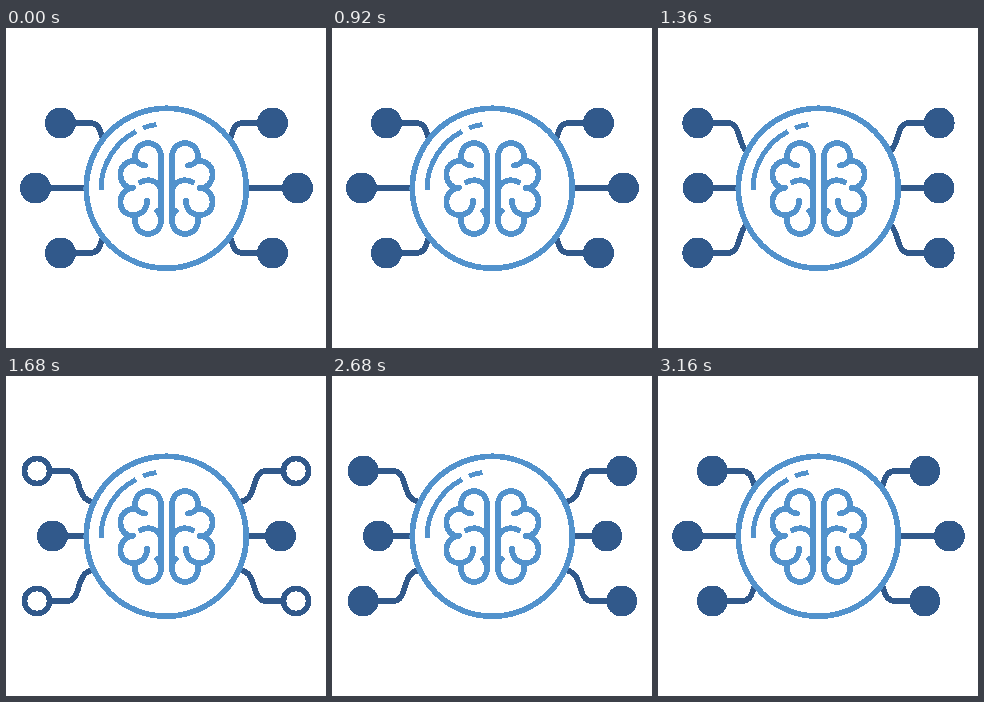
Animation, 320 px wide and 320 px high, one loop 3.64 s. Source, as an HTML page:

```html
<!DOCTYPE html>
<html lang="en">
<head>
<meta charset="utf-8">
<title>Brain network</title>
<style>
  html, body { margin: 0; width: 100%; height: 100%; overflow: hidden; background: #fff; }
  svg { display: block; width: 100vw; height: 100vh; }
</style>
</head>
<body>
<svg viewBox="0 0 320 320" fill="none" stroke-width="5.7" shape-rendering="crispEdges">
  <defs>
    <g id="node">
      <circle r="12.6" fill="#fff"/>
      <circle class="core" r="11" fill="#31598b" stroke="none"/>
    </g>
    <g id="corner">
      <path d="M31 95H60.5C69 95 70.5 102 73 110S78 126 90 126H130"/>
      <use href="#node" x="31" y="95"/>
    </g>
    <g id="side" stroke="#31598b">
      <g class="corner"><use href="#corner"/></g>
      <g transform="matrix(1 0 0 -1 0 320)"><g class="corner"><use href="#corner"/></g></g>
      <g class="middle">
        <path d="M29.500 160H110"/>
        <use href="#node" x="29.500" y="160"/>
      </g>
    </g>
    <g id="lobes" stroke-linecap="round" stroke-linejoin="round">
      <path d="M155 193V128A13 13 0 0 0 129 128C129 133 133 137 139 137.500"/>
      <path d="M130 133C121 132 114.500 138 114.500 146C114.500 155 120 160 127 160"/>
      <path d="M127 160C120 160 114.500 166 114.500 174C114.500 182 120 187 127 187C136 187 141 181 141 173"/>
      <path d="M130 187C129 189 129 191 129 193A13 13 0 0 0 155 193Q155 186 151 183"/>
      <path d="M135 154Q141 151 147 153T155 162"/>
    </g>
  </defs>
  <use href="#side"/>
  <use href="#side" transform="matrix(-1 0 0 1 321 0)"/>
  <g stroke="#5292cc">
    <circle cx="160.300" cy="160.300" r="80" fill="#fff"/>
    <path stroke-width="5" d="M95 162A65 65 0 0 1 130 103.500M137 100Q143 97.500 150.500 96.500"/>
    <use href="#lobes"/>
    <use href="#lobes" transform="matrix(-1 0 0 1 321 0)"/>
  </g>
</svg>
<style id="pose"></style>
<script>
const LOOP = 3640, STEP = 40;
const pose = document.getElementById("pose");
const clamp = v => Math.min(1, Math.max(0, v));
const span = (t, start, length) => clamp((t - start) / length);
const bezier = (a, b, s) => 3 * a * s * (1 - s) ** 2 + 3 * b * s * s * (1 - s) + s ** 3;

function ease(x) {
  let lo = 0, hi = 1;
  for (let i = 0; i < 20; i++) {
    const mid = (lo + hi) / 2;
    if (bezier(.43, .4, mid) < x) lo = mid; else hi = mid;
  }
  return bezier(0, 1, lo);
}

// Nodes turn hollow at once, then their core grows back.
const refill = (t, start, length) => t < start ? 1 : 1 - (1 - span(t, start, length)) ** 3;

function draw(now) {
  const t = Math.floor(now % LOOP / STEP) * STEP;
  const swap = ease(span(t, 1080, 560)) - ease(span(t, 2640, 560));
  const all = refill(t, 520, 520);
  const corners = t < 1680 ? all : refill(t, 1680, 440);
  pose.textContent = `
    .corner { transform: translateX(${23.5 * (1 - swap)}px); --fill: ${corners}; }
    .middle { transform: translateX(${17 * swap}px); --fill: ${all}; }
    .core { transform: scale(var(--fill)); }`;
  requestAnimationFrame(draw);
}
requestAnimationFrame(draw);
</script>
</body>
</html>
```
